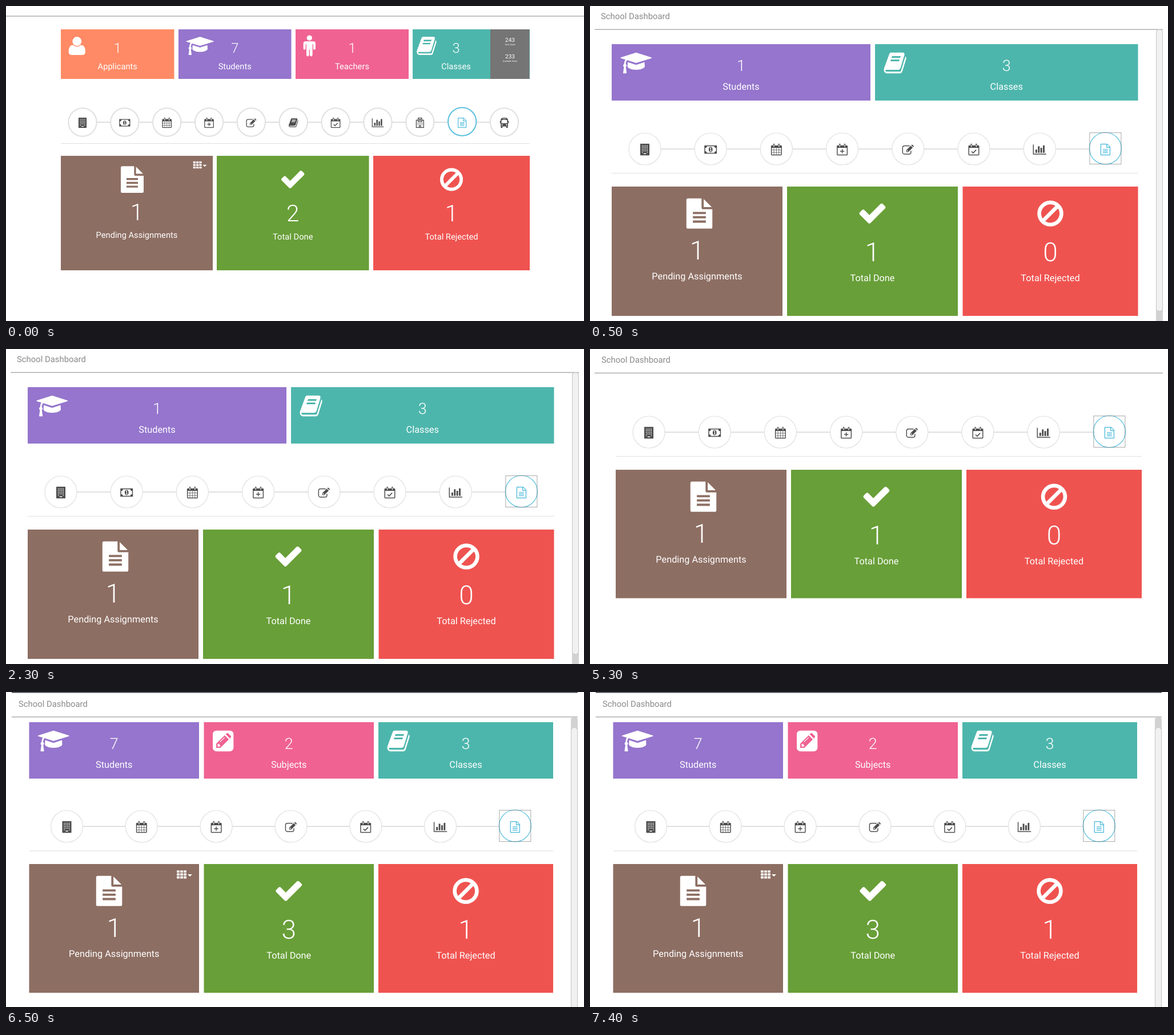
These frames come from a looping animation (1012 by 553 pixels, 8 s). An HTML page:

```html
<!DOCTYPE html>
<html lang="en">
<head>
<meta charset="utf-8">
<title>School Dashboard</title>
<style>
  html, body { margin: 0; width: 100%; height: 100%; overflow: hidden; background: #fff; }
  svg { display: block; font-family: Roboto, sans-serif; text-rendering: geometricPrecision; }
</style>
</head>
<body>
<svg id="stage" width="1012" height="553" viewBox="0 0 1012 553"></svg>
<script>
const PURPLE = '#9575cd', TEAL = '#4db6ac', PINK = '#f06292', ORANGE = '#ff8a65';
const BROWN = '#8d6e63', GREEN = '#689f38', RED = '#ef5350';
const DARK = '#4d4d4d', BLUE = '#5bc0de', PALE = '#e0e0e0';

// Icon parts on a 14-unit grid
const fill = d => `<path fill-rule="evenodd" d="${d}"/>`;
const line = (d, width = 1, color = 'currentColor', extra = '') =>
  `<path fill="none" stroke="${color}" stroke-width="${width}" ${extra} d="${d}"/>`;
const calendarTop =
  line('M3.5 1V3.5M9.5 1V3.5', 2, 'currentColor', 'stroke-linecap="round"') + line('M3.5 1V4M9.5 1V4', .8, '#fff');
const calendarBody =
  fill('M1 2H12Q13 2 13 3V13Q13 14 12 14H1Q0 14 0 13V3Q0 2 1 2ZM1 5V13H12V5Z') + calendarTop;
const textLines = 'M3 6.25H9v1H3ZM3 8.25H9v1H3ZM3 10.25H9v1H3Z';
const pencilCap = 'M10.9.8L11.4.3Q11.9-.1 12.4.3L13.7 1.6Q14.1 2.1 13.7 2.6L13.2 3.1Z';

// name: [width, height, markup]
const ICONS = {
  file: [12, 14, fill('M.75 0H7V4.25A.75.75 0 0 0 7.75 5H12V13.25A.75.75 0 0 1 11.25 14H.75A.75.75 0 0 1 0 13.25V.75' +
    'A.75.75 0 0 1 .75 0ZM8 .3L11.7 4H8Z' + textLines)],
  fileOutline: [12, 14, fill('M.75 0H7.75Q8.3 0 8.7.4L11.5 3.3Q12 3.7 12 4.25V13.25A.75.75 0 0 1 11.25 14H.75' +
    'A.75.75 0 0 1 0 13.25V.75A.75.75 0 0 1 .75 0ZM1 1V13H11V5H7.75A.75.75 0 0 1 7 4.25V1ZM8 1.1V4H10.9L10.7 3.6 8.4 1.3Z' + textLines)],
  check: [12.1, 9.3, fill('M12.1 1.8q0 .31-.22.53l-5.66 5.66-1.06 1.06q-.22.22-.53.22t-.53-.22l-1.06-1.06-2.83-2.83' +
    'q-.22-.22-.22-.53t.22-.53l1.06-1.06q.22-.22.53-.22t.53.22l2.3 2.3 5.13-5.13q.22-.22.53-.22t.53.22l1.06 1.06q.22.22.22.53z')],
  ban: [12, 12, line('M.875 6a5.125 5.125 0 0 1 10.25 0a5.125 5.125 0 0 1-10.25 0M2.4 9.6L9.6 2.4', 1.75)],
  user: [11, 12, '<circle cx="5.5" cy="3" r="3"/>' +
    fill('M2.9 5.4Q5.5 7.6 8.1 5.4Q11 5.3 11 9.8Q11 12 8.8 12H2.2Q0 12 0 9.8Q0 5.3 2.9 5.4Z')],
  cap: [18, 12, fill('M18 3Q18 3.2 17.8 3.25L9 6 3.8 4.38Q3.1 5 3 6.65Q3.5 6.9 3.5 7.5Q3.5 8 3.04 8.35L3.5 11.7' +
    'Q3.5 12 3.2 12H1.75Q1.4 12 1.5 11.7L1.96 8.35Q1.5 8 1.5 7.5Q1.5 6.9 2 6.65Q2.1 5 2.78 4.06L.18 3.25Q0 3.2 0 3' +
    'Q0 2.8.18 2.76L9 0 17.8 2.76Q18 2.8 18 3ZM13.86 5.53L14 8Q14 9 11.5 9.7Q9 10.2 6.5 9.7Q4 9 4 8L4.14 5.53 8.6 6.95Q9 7.1 9.4 6.95Z')],
  male: [8, 14, '<circle cx="4" cy="1.75" r="1.75"/>' + fill('M8 5.5V8.75a.75.75 0 0 1-1.5 0V6H6V13.1a.88.88 0 0 1-1.75 0V9.5' +
    'h-.5V13.1a.88.88 0 0 1-1.75 0V6H1.5V8.75a.75.75 0 0 1-1.5 0V5.5A1.5 1.5 0 0 1 1.5 4H6.5A1.5 1.5 0 0 1 8 5.5Z')],
  book: [13, 12, fill('M4.3 0H10.9Q12.1.1 11.9 1.3L9.7 8.6Q9.3 10 8 10H1.2Q.8 10.1.9 10.5Q1.1 11 2 11H9.2Q9.7 11 9.9 10.5' +
    'L12.3 2.8Q12.4 2.5 12.35 2.2Q13.1 2.6 12.9 3.6L10.7 10.8Q10.3 12 9.2 12H2Q.6 12 .1 10.6Q-.1 10 .1 9.2L3 1.2Q3.4-.1 4.3 0Z' +
    'M4.75 2H9.75L9.4 3H4.4ZM4.1 4H9.1L8.75 5H3.75Z')],
  pencil: [12, 12, fill('M2.25 0H9.75Q12 0 12 2.25V9.75Q12 12 9.75 12H2.25Q0 12 0 9.75V2.25Q0 0 2.25 0Z' +
    'M2 10V7.6L6.9 2.7 9.3 5.1 4.4 10ZM7.5 2.1L8 1.6Q8.5 1.2 9 1.6L10.4 3Q10.8 3.5 10.4 4L9.9 4.5ZM2.8 8V9.2H4L4.5 8.7 3.3 7.5Z') +
    line('M6.9 3.9L4.2 6.6', .35)],
  building: [11, 14, '<rect width="11" height="14" rx=".5"/>' +
    line('M2 2.5H9M2 4.5H9M2 6.5H9M2 8.5H9', 1, '#fff', 'stroke-dasharray="1"') + line('M2 10.5H3M8 10.5H9M4 12H7', 1, '#fff')],
  money: [15, 10, fill('M0 0H15V10H0ZM3 1H12A2 2 0 0 0 14 3V7A2 2 0 0 0 12 9H3A2 2 0 0 0 1 7V3A2 2 0 0 0 3 1Z') +
    '<ellipse cx="7.5" cy="5" rx="2.3" ry="3"/>' + line('M6.6 3.7L7.6 3.1V6.5M6.4 6.7H8.7', .8, '#fff')],
  calendar: [13, 14, calendarBody + line('M3.5 5V13M6.5 5V13M9.5 5V13M1 7.5H12M1 10.5H12', .5)],
  calendarPlus: [13, 14, calendarBody + line('M6.5 6.5v5M4 9h5')],
  calendarCheck: [13, 14, calendarBody + line('M3.8 9.2l1.9 1.9 3.6-3.7', 1.1)],
  edit: [14, 12, line('M9 1.5H2.75A2.25 2.25 0 0 0 .5 3.75V9.25A2.25 2.25 0 0 0 2.75 11.5H8.25A2.25 2.25 0 0 0 10.5 9.25V7.5') +
    fill('M5 9V6.7L10.3 1.4 12.6 3.7 7.3 9ZM5.7 7.3V8.3H6.7L7.3 7.7 6.3 6.7Z' + pencilCap)],
  bars: [16, 12, line('M.5 0V11.5H16') + line('M4 10V6M7 10V2M10 10V4M13 10V1', 2)],
  hospital: [11, 14, line('M3 3.5H.5V13.5H10.5V3.5H8M3 .5H8V5.5H3ZM4.5 1.5V4.5M6.5 1.5V4.5M4.5 3H6.5M4.5 13.5V11H6.5V13.5') +
    line('M2 7.5H9M2 9.5H9', 1, 'currentColor', 'stroke-dasharray="1"')],
  bus: [12, 14, fill('M1 3Q1 0 6 0Q11 0 11 3V12H1ZM2.4 3.2L2 7.5H10L9.6 3.2ZM4 1.2V2H8V1.2Z') +
    '<path d="M0 4.5H1V7.5H0ZM11 4.5H12V7.5H11ZM1.3 12H3.5V14H1.3ZM8.5 12H10.7V14H8.5Z"/>' +
    '<g fill="#fff"><circle cx="3" cy="9.8" r=".9"/><circle cx="9" cy="9.8" r=".9"/></g>'],
  menu: [13, 11, line('M0 1.5H13M0 5.5H13M0 9.5H13', 3, 'currentColor', 'stroke-dasharray="3.67 1"')],
};

const icon = (name, cx, cy, unit, color = '#fff') => {
  const [w, h, markup] = ICONS[name];
  return `<g color="${color}" fill="${color}" transform="translate(${cx - w * unit / 2} ${cy - h * unit / 2}) scale(${unit})">${markup}</g>`;
};
const rect = (x, y, x2, y2, color, extra = '') =>
  `<rect x="${x}" y="${y}" width="${x2 - x}" height="${y2 - y}" fill="${color}" ${extra}/>`;
const text = (str, x, cy, size, weight = 400, color = '#fff', anchor = 'middle') =>
  `<text x="${x}" y="${cy + size * .355}" font-size="${size}" font-weight="${weight}" fill="${color}" text-anchor="${anchor}">${str}</text>`;

// Small tile: icon on the left, count and label centred
function smallTile(s, [x, x2, color, name, count, label, iconShift = 0, textX = (x + x2) / 2]) {
  const { k, top, labelSize } = s, unit = 3.03 * k;
  return rect(x, top, x2, top + s.tileHeight, color) +
    icon(name, x + 15.5 * k + ICONS[name][0] * unit / 2 + iconShift, top + 33 * k, unit) +
    text(count, textX, top + 37 * k, 27 * k, 300) +
    text(label, textX, top + 74 * k, labelSize);
}

function steps(s) {
  const { k, stepY: y, stepX, stepGap, active } = s, r = 28 * k;
  const last = stepX + stepGap * (s.steps.length - 1);
  return line(`M${stepX} ${y}H${last}`, 2, PALE) + s.steps.map((name, i) => {
    const x = stepX + stepGap * i, on = i === active, cy = on ? y - 1 : y;
    return `<circle cx="${x}" cy="${cy}" r="${r}" fill="#fff" stroke="${on ? BLUE : PALE}" stroke-width="${s.ring}"/>` +
      icon(name, x, y + 1, 1.46 * k, on ? BLUE : DARK) +
      (on && s.focus ? rect(x - 27.5, y - 28.5, x + 27.5, y + 26.5, 'none', 'stroke="#555" stroke-dasharray="1"') : '');
  }).join('') + rect(s.left, s.ruleY, s.right, s.ruleY + 1, PALE);
}

const BIG = [
  [BROWN, 'file', 'Pending Assignments'],
  [GREEN, 'check', 'Total Done'],
  [RED, 'ban', 'Total Rejected'],
];
function bigTiles(s) {
  const { k, bigTop: top, bigBottom, edges, labelSize } = s;
  return BIG.map(([color, name, label], i) => {
    const x = edges[2 * i], x2 = edges[2 * i + 1], cx = (x + x2) / 2, lift = i ? 0 : 3;
    return rect(x, top, x2, bigBottom, color) +
      icon(name, cx + (i ? 0 : s.fileShift), top + 47.3 * k, 3.79 * k) +
      text(s.counts[i], cx, top + (114.7 - lift) * k, 46 * k, 300) +
      text(label, cx, top + (160.7 - lift) * k, labelSize);
  }).join('') + (s.menu ? menu(edges[1], top, k) : '');
}
const menu = (right, top, k) => icon('menu', right - 30.5 * k, top + 18.3 * k, 1.29 * k) +
  `<path fill="#fff" d="M${right - 20 * k} ${top + 18 * k}h${8 * k}l${-4 * k} ${4 * k}z"/>`;

const header = (x, x2, y, titleX, titleY) => rect(x, y, x2, y + 1.5, '#b0b0b0') +
  (titleX ? text('School Dashboard', titleX, titleY, 14.85, 400, '#8a8a8a', 'start') : '');
const scrollbar = (x, top, thumbTop, thumbBottom) =>
  rect(x, top, x + 12, 560, '#d2d2d2', 'rx="5"') +
  rect(x + .5, thumbTop, x + 11.5, thumbBottom, '#f1f1f1', 'rx="5" stroke="#c4c4c4"');
const seats = rect(848, 41, 916.5, 128, '#757575') + [['243', 'Total Seats', 59], ['233', 'Available Seats', 88]]
  .map(([n, label, y]) => text(n, 882.5, y, 10) + text(label, 882.5, y + 8.3, 3.8)).join('');

const base = { k: 1, labelSize: 16.3, ring: 1.2, tileHeight: 99, tiles: [], focus: true, fileShift: 4 };
const eight = ['building', 'money', 'calendar', 'calendarPlus', 'edit', 'calendarCheck', 'bars', 'fileOutline'];
const SCENES = [
  { ...base, start: 0, k: .88, labelSize: 14.7, ring: 2, focus: false, menu: true, fileShift: -8,
    before: header(0, 1012, 17), after: seats, top: 41, tileHeight: 87,
    tiles: [[96, 294.5, ORANGE, 'user', 1, 'Applicants'], [302, 499.5, PURPLE, 'cap', 7, 'Students'],
      [507, 705, PINK, 'male', 1, 'Teachers'], [712, 917, TEAL, 'book', 3, 'Classes', -6.5, 788]],
    steps: ['building', 'money', 'calendar', 'calendarPlus', 'edit', 'book', 'calendarCheck', 'bars', 'hospital', 'fileOutline', 'bus'],
    stepX: 134, stepGap: 73.85, stepY: 204, active: 9, left: 96, right: 917, ruleY: 241,
    bigTop: 263, bigBottom: 464, edges: [96, 362, 369, 635.5, 643, 917], counts: [1, 2, 1] },
  { ...base, start: 500, before: header(8, 1003, 40.5, 19, 18) + scrollbar(991, 41, 41.5, 536), top: 67,
    tiles: [[38, 491, PURPLE, 'cap', 1, 'Students'], [499, 959.5, TEAL, 'book', 3, 'Classes']],
    steps: eight, stepX: 96, stepGap: 115.2, stepY: 251, active: 7, left: 38, right: 959.5, ruleY: 293,
    bigTop: 317, bigBottom: 544, edges: [38, 337, 345, 644, 652.5, 959.5], counts: [1, 1, 0] },
  { ...base, start: 3500, before: header(8, 1003, 41.5, 20, 19),
    steps: eight, stepX: 103, stepGap: 115.2, stepY: 146, active: 7, left: 45, right: 966, ruleY: 188,
    bigTop: 212, bigBottom: 437.5, edges: [45, 344, 352, 651, 659, 966], counts: [1, 1, 0] },
  { ...base, start: 6500, before: rect(10, 0, 1001, 1.5, '#434857') + header(10, 1001, 43, 22, 21) + scrollbar(989, 44, 62.5, 560), top: 53,
    tiles: [[40.5, 338, PURPLE, 'cap', 7, 'Students'], [346.5, 644, PINK, 'pencil', 2, 'Subjects'], [652, 958, TEAL, 'book', 3, 'Classes']],
    steps: eight.filter(name => name !== 'money'), stepX: 106.5, stepGap: 130.8, stepY: 236, active: 6,
    left: 40.5, right: 958, ruleY: 278.5, menu: true, fileShift: -8.7,
    bigTop: 302, bigBottom: 528, edges: [40.5, 338, 346.5, 644, 652, 958], counts: [1, 3, 1] },
];

const stage = document.getElementById('stage');
stage.innerHTML = SCENES.map(s => '<g>' + s.before + s.tiles.map(tile => smallTile(s, tile)).join('') +
  (s.after || '') + steps(s) + bigTiles(s) + '</g>').join('');
const groups = [...stage.children];

function render() {
  const t = performance.now() % 8000;
  const current = SCENES.findLastIndex(s => s.start <= t);
  groups.forEach((g, i) => g.style.display = i === current ? '' : 'none');
  requestAnimationFrame(render);
}
render();
</script>
</body>
</html>
```
